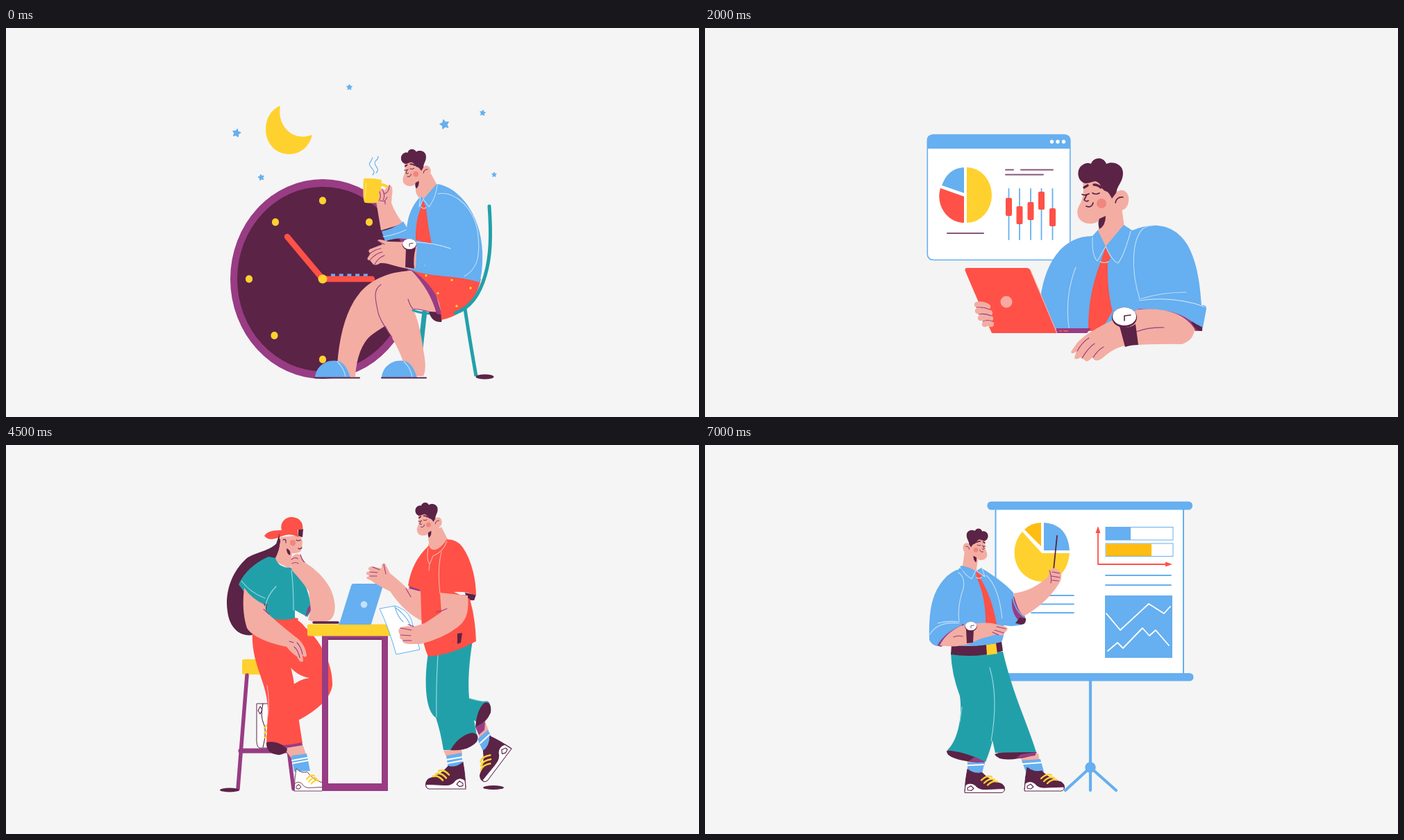
Write an HTML page that moves like this. It is 998 px wide and 561 px high and loops after 8 s.

```html
<!DOCTYPE html>
<html lang="en">
<head>
<meta charset="utf-8">
<title>Work day</title>
<style>
html, body { margin: 0; width: 100%; height: 100%; overflow: hidden; background: #f5f5f5; }
svg { display: block; width: 100%; height: 100%; }
.scene { visibility: hidden; animation: 8s step-end infinite; }
#coffee { animation-name: coffee; }
#desk { animation-name: desk; }
#meeting { animation-name: meeting; }
#talk { animation-name: talk; }
@keyframes coffee { 0% { visibility: visible; } 6.25%, 100% { visibility: hidden; } }
@keyframes desk { 0% { visibility: hidden; } 6.25% { visibility: visible; } 37.5%, 100% { visibility: hidden; } }
@keyframes meeting { 0% { visibility: hidden; } 37.5% { visibility: visible; } 68.75%, 100% { visibility: hidden; } }
@keyframes talk { 0% { visibility: hidden; } 68.75%, 100% { visibility: visible; } }
.blue { fill: #66aff0; }
.red { fill: #ff5147; }
.gold { fill: #ffd12e; }
.amber { fill: #ffbc12; }
.dark { fill: #5b2346; }
.plum { fill: #983c84; }
.skin { fill: #f4ada2; }
.teal { fill: #22a0aa; }
.white { fill: #fff; }
.ln { fill: none; stroke: #5b2346; stroke-width: 1.1; stroke-linecap: round; stroke-linejoin: round; }
.pale { stroke: #bfe0fb; }
.sky { stroke: #66aff0; }
.coral { stroke: #ff5147; }
.sun { stroke: #ffd12e; }
.violet { stroke: #983c84; }
.sea { stroke: #22a0aa; }
.snow { stroke: #fff; }
</style>
</head>
<body>
<svg viewBox="0 0 998 561">
<defs>
  <path id="star" class="blue" d="M0-1 .28-.42 .95-.31 .47.16 .59.81 0 .52-.59.81-.47.16-.95-.31-.28-.42Z" stroke="#66aff0" stroke-width=".2" stroke-linejoin="round"/>
  <g id="head">
    <path class="skin" d="M569 266 566 298Q568 312 577 316L604 288 600 258Z"/>
    <path class="skin" d="M544 222C546 235 545 245 540 254C533 264 535 280 552 282C562 283 568 279 573 272L599 263C608 262 611 252 610 244C608 234 600 232 594 236L588 215Z"/>
    <path class="dark" d="M577 271Q577 285 568 290Q565 281 568 275Z"/>
    <path class="dark" d="M548 224C536 222 534 204 543 198C549 193 555 195 556 196C559 186 574 185 578 196C588 191 602 197 602 209C602 222 594 226 592 238L586 246C583 240 581 236 576 235C568 230 572 224 562 221C556 222 552 224 548 224Z"/>
    <circle cx="571" cy="253" r="7" fill="#f18580"/>
    <path class="ln" style="stroke-width:3.4" d="M546 230 551 227M560 226Q566 226 570 230"/>
    <path class="ln" style="stroke-width:1.7" d="M543 240Q548 242 553 239M558 238Q563 241 568 238M550 240 546 248Q549 251 552 249M549 257Q557 260 559 252M591 252Q593 243 602 244M557 197Q559 203 563 205"/>
  </g>
  <g id="shoe">
    <path fill="var(--c)" stroke="#5b2346" d="M4-34Q14-26 25-29Q36-17 53-13Q59-9 57-3L0-2Q1-20 4-34Z"/>
    <path class="white" stroke="#5b2346" d="M1-11Q8-16 15-11Q20-4 31-5L57-6Q58-1 53 0H0Z"/>
    <path class="ln" d="M4-7 9-10 13-6 9-3 4-4Z"/>
    <path class="ln sun" style="stroke-width:2.4" d="M24-18Q32-26 39-23M28-14Q36-22 43-19M33-11Q40-18 47-16"/>
  </g>
  <g id="slipper">
    <path class="blue" d="M0 0C1-14 14-26 30-24C41-24 47-13 51 0Z"/>
    <path class="ln pale" d="M32-23Q42-13 44-1"/>
    <path class="ln" style="stroke-width:2" d="M0 .5H64"/>
  </g>
  <g id="watch">
    <ellipse class="dark" cy="1.5" rx="18" ry="14.5"/>
    <ellipse class="white" rx="17" ry="13"/>
    <path class="ln" style="stroke-width:1.6" d="M9-2 0-1V6"/>
  </g>
</defs>

<g id="coffee" class="scene">
  <use href="#star" transform="translate(332 151.5)rotate(12)scale(6)"/>
  <use href="#star" transform="translate(367.5 215.5)rotate(-12)scale(4.6)"/>
  <use href="#star" transform="translate(494.5 85.5)scale(4.3)"/>
  <use href="#star" transform="translate(631.5 139)rotate(-14)scale(6.7)"/>
  <use href="#star" transform="translate(686.5 122.5)rotate(8)scale(4.3)"/>
  <use href="#star" transform="translate(703 211.5)scale(3.7)"/>
  <path class="gold" d="M395 112C381 118 374 131 374 146C374 167 389 182 408 182C424 182 437 171 441 154C433 157 421 159 409 151C397 142 392 127 395 112Z"/>
  <ellipse class="plum" cx="456" cy="362" rx="133" ry="144"/>
  <ellipse class="dark" cx="456" cy="362" rx="123" ry="133"/>
  <path class="ln sun" style="stroke-width:10" d="M456 248.5v1M388 279.5v1M523 279.5v1M350 361.5v1M386.5 443v1M456 477.5v1"/>
  <path class="ln sky" style="stroke-width:4;stroke-dasharray:6 5.7;stroke-linecap:butt" d="M468 356.5H522"/>
  <path class="ln coral" style="stroke-width:8.5" d="M405 301 456 362H527"/>
  <circle class="gold" cx="456" cy="362" r="6.5"/>

  <path class="ln sea" style="stroke-width:7;stroke-linecap:butt" d="M603 408 597 462"/>
  <path class="skin" d="M583 350C541 352 515 370 501 394Q481 428 477 486L492 503H503Q505 468 520 449C532 435 556 428 575 405Z"/>
  <path class="skin" d="M583 350C545 356 526 368 533 392C537 425 563 450 572 482L588 502H601Q606 492 602 470C599 448 594 420 586 405L623 412 612 360Z"/>
  <path class="ln violet" d="M540 370C527 378 533 395 536 411C540 425 548 434 556 446M579 391Q582 401 586 405Q602 406 618 412"/>
  <use href="#slipper" x="445" y="504"/>
  <use href="#slipper" x="541" y="504"/>
  <path class="ln sea" style="stroke-width:3" d="M586 407Q600 413 628 412"/>
  <path class="dark" d="M609 409 630 410 627 424Q613 425 609 409Z"/>
  <path class="plum" d="M584 350Q611 378 620 412L628 414 612 360Z"/>
  <path class="red" d="M585 349 684 362Q678 390 657 408Q643 418 627 421C627 388 611 368 585 349Z"/>
  <path class="ln sun" style="stroke-width:3.5" d="M605 357v.1M642 363.5v.1M669 375v.1M622 382.5v.1M649 401v.1"/>
  <path class="ln sea" style="stroke-width:5" d="M696 257C699 300 698 330 690 357C682 385 668 404 647 411"/>
  <path class="ln sea" style="stroke-width:5;stroke-linecap:butt" d="M661 405Q667 445 677 502"/>
  <ellipse class="dark" cx="689.5" cy="503" rx="13" ry="3.6"/>

  <path class="blue" d="M596 244 606 250 622 225C655 231 684 272 686 322Q687 350 682 367C650 356 615 360 587 350Q563 343 557 335L578 325 577 300C576 275 584 257 596 244Z"/>
  <path class="skin" d="M596 224 612 210 621 227 602 249 596 242Z"/>
  <use href="#head" transform="translate(607 205)rotate(-6)scale(.56)translate(-602 -246)"/>
  <path class="blue" d="M597 241 601 247 620 225 623 228 615 250 603 250 596 262Z"/>
  <path class="red" d="M600 247 605 259Q607 283 613 311L590 306Q589 278 598 258Z"/>
  <path class="ln pale" d="M597 242 595 258 601 247 609 258Q619 245 621 227M622 239C648 235 673 260 679 292C683 322 682 346 660 358M591 309Q617 310 640 318M598 258Q601 262 605 259"/>
  <path class="skin" d="M533 250 540 292 572 282Q560 267 555 252Q557 235 553 226L545 239 540 252Z"/>
  <path class="blue" d="M541 293C553 291 564 285 572 279L589 306Q562 300 546 308Z"/>
  <path class="ln pale" d="M543 301Q562 298 576 291"/>
  <path class="gold" d="M515 217Q528 216 541 219L539 249Q537 254 517 252Q513 250 515 217Z"/>
  <path class="ln sun" style="stroke-width:4" d="M541 226Q552 227 549 237Q547 245 538 248"/>
  <path class="ln" style="stroke:#ffe995" d="M519 223 517 245"/>
  <path class="skin" d="M537 237Q539 228 545 234L552 226Q558 228 556 240Q552 254 546 257L535 251Q539 246 537 237Z"/>
  <path class="ln violet" d="M538 236Q541 244 537 249M542 233Q547 242 543 248M552 227Q552 237 545 239M539 249 545 250 549 244M546 250V254"/>
  <path class="ln sky" d="M528 212C536 205 518 199 525 193L528 187M533 209C541 202 526 198 533 191Q536 189 536 185"/>
  <path class="skin" d="M592 309 550 308Q539 304 535 306L542 312 524 319Q520 322 525 325L521 331Q519 335 524 335L529 341Q534 343 539 339C553 338 570 349 590 347Z"/>
  <path class="ln violet" d="M523 326Q532 319 540 318M524 335Q532 325 542 323M531 341Q536 331 545 328M535 307 545 312"/>
  <path class="dark" d="M576 317H590Q586 332 588 347L575 345Z"/>
  <use href="#watch" transform="translate(581 311.5)scale(.58)"/>
  <path class="blue" d="M591 309 618 312 622 348 589 347Q595 334 591 309Z"/>
  <path class="ln pale" d="M591 309Q617 310 640 318M603 342v.5"/>
</g>

<g id="desk" class="scene">
  <rect width="998" height="561" fill="#f4f4f4"/>
  <rect class="white" x="320.3" y="154" width="205.5" height="180.5" rx="8" stroke="#66aff0" stroke-width="1.6"/>
  <path class="blue" d="M320 174V161Q320 154 328 154H518Q526 154 526 161V174Z"/>
  <path class="ln snow" style="stroke-width:5.4" d="M499.5 164v.1M508 164v.1M516.5 164v.1"/>
  <path class="gold" d="M377 201A36 40 0 0 1 377 281Z"/>
  <path class="blue" d="M373 201V238L341 227Q350 202 373 201Z"/>
  <path class="red" d="M339 231 373 243V281C347 280 332 254 339 231Z"/>
  <path class="ln" style="stroke-width:2;stroke:#87567c" d="M349 296H401M433 204.5H444M455 204.5H501M433 211.5H487"/>
  <path class="ln sky" style="stroke-width:1.8" d="M437.5 232V305M453 232V305M469 232V305M484.5 232V305M500.5 232V305"/>
  <g class="red">
    <rect x="433" y="245" width="9" height="26" rx="2"/>
    <rect x="448.5" y="257" width="9" height="26" rx="2"/>
    <rect x="464.5" y="251" width="9" height="26" rx="2"/>
    <rect x="480" y="236" width="9" height="26" rx="2"/>
    <rect x="496" y="260" width="9" height="26" rx="2"/>
  </g>
  <path class="blue" d="M483 390C490 335 517 300 558 300L566 291 577 316 603 284 615 292C645 279 676 282 695 313C709 338 713 370 715 400L640 412 590 437H500Z"/>
  <use href="#head"/>
  <path class="blue" d="M566 292 577 315 603 284 615 292 603 330Q598 340 595 340L578 318 567 336Q558 330 558 304Z"/>
  <path class="red" d="M577 315 584 332 580 338Q579 380 587 408L570 437H552Q551 385 570 337Z"/>
  <path class="ln pale" d="M558 302Q557 329 565 336L577 315Q587 337 595 339Q604 327 613 293M569 337Q575 340 581 337M534 345Q518 386 524 432M626 391C612 345 616 305 630 290Q636 285 645 285M626 391Q658 381 693 381"/>
  <path class="plum" d="M506 433H556L550 440H506Z"/>
  <path class="ln coral" style="stroke-width:2" d="M511 437h2M517 437h5"/>
  <path class="red" d="M378 346H463Q467 346 469 350L507 440H413L375 351Q373 346 378 346Z"/>
  <path class="ln" style="stroke:#f7b2b0" d="M469 350 507 440"/>
  <circle cx="434" cy="395" r="8.5" fill="#f7a9a2"/>
  <path class="ln" style="stroke:#f4ada2;stroke-width:8.5" d="M392 399Q401 398 407 402M393 408Q403 407 410 411M397 418Q405 416 411 419M403 427Q409 424 412 427"/>
  <path class="ln violet" d="M391 403Q401 402 410 406M394 413Q404 411 412 415M400 423Q407 420 414 423"/>
  <path class="plum" d="M624 402Q680 402 708 426L716 437 706 437Q690 412 624 408Z"/>
  <path class="dark" d="M700 424 717 421 716 437Q707 438 700 424Z"/>
  <path class="blue" d="M626 391Q670 384 715 400Q722 399 722 405L717 432Q707 427 696 420C676 406 650 406 624 405Q621 396 626 391Z"/>
  <path class="ln pale" d="M625 393Q676 386 719 402"/>
  <path class="skin" d="M588 421C566 431 546 443 536 454L527 467Q528 472 535 466L532 475Q533 480 541 475L547 479Q549 484 558 475Q562 483 571 477C583 467 593 460 606 458Q650 455 687 456Q704 450 705 434C693 414 665 402 624 406Z"/>
  <path class="ln violet" d="M536 466Q543 453 553 447M543 476Q552 461 561 455M559 475Q566 464 574 460M621 438Q640 431 661 432"/>
  <path class="dark" d="M597 430Q609 435 620 427L624 457Q613 457 605 460Z"/>
  <use href="#watch" x="604" y="416"/>
</g>

<g id="meeting" class="scene">
  <path class="gold" d="M343 309H390V331H343Q340 331 340 328V312Q340 309 343 309Z"/>
  <path class="ln violet" style="stroke-width:5.5" d="M347 332 334 496M407 440 414 496"/>
  <path class="ln violet" style="stroke-width:7" d="M338 441H408"/>
  <ellipse class="dark" cx="322" cy="497.5" rx="14" ry="3"/>
  <path class="white" stroke="#5b2346" d="M361 373H380V437H365Q360 435 361 420Z"/>
  <path class="ln" d="M370 373Q366 390 371 402Q376 412 370 436M366 377 369 382 366 388 363 383Z"/>
  <path class="ln sun" style="stroke-width:2.4" d="M379 401 372 408M379 409 372 416M379 417 373 422"/>
  <path class="dark" d="M396 134C385 153 362 153 347 163C323 184 315 216 319 240C322 266 340 279 359 273L380 240Z"/>
  <path class="red" d="M402 250Q418 246 431 263C455 284 471 318 470 347Q466 373 421 397L413 380 410 349Q421 338 437 336Q418 333 405 315Z"/>
  <path class="red" d="M355 268C352 318 378 342 377 385L375 431Q400 437 427 430Q421 394 417 362Q415 335 406 305L421 250 390 245Z"/>
  <path class="ln pale" style="stroke:#ffb1a5" d="M376 347Q380 369 377 392"/>
  <path class="skin" d="M400 437 427 431 434 452 412 453Z"/>
  <path class="dark" d="M375 429Q387 425 404 436Q408 444 393 447Q374 445 375 429Z"/>
  <path class="plum" d="M399 433Q413 432 426 429L427 433 403 437Z"/>
  <path class="blue" d="M411 448 433 445 438 470 415 471Z"/>
  <path class="ln snow" style="stroke-width:2" d="M412 455 434 451M413 459 435 455"/>
  <use href="#shoe" transform="translate(415 499)scale(.75 .95)" style="--c:#fff"/>

  <path class="skin" d="M395 133 424 130 427 139 426 150Q424 157 412 156L410 179 386 167Q396 149 395 133Z"/>
  <path class="dark" d="M404 149Q411 152 409 159Q404 157 404 149ZM421 122 428 121 427 133 421 131Z"/>
  <path class="red" d="M372 131Q377 122 397 123C394 112 402 104 411 104C423 104 429 113 427 122L420 122 421 133Q409 126 396 132Q378 140 372 131Z"/>
  <path class="dark" d="M396 121Q392 130 395 138L392 148 388 146Z"/>
  <circle cx="413" cy="141" r="4.2" fill="#f18580"/>
  <path class="ln" d="M418 137Q421 139 424 137M421 149Q423 151 426 148M399 137Q404 134 403 141"/>
  <path class="plum" d="M343 199 374 220 367 236Q349 222 343 208Z"/>
  <path class="teal" d="M335 201Q347 175 378 161L388 163Q392 177 410 177L420 183Q436 205 440 238L434 248 416 238V250Q393 255 373 247L376 229 365 229Q348 221 335 201Z"/>
  <path class="ln" style="stroke:#9cdde0" d="M339 196Q352 213 373 221M373 241Q373 220 389 204M411 181Q414 202 414 238"/>
  <path class="skin" d="M343 206Q354 222 372 230L375 241Q393 258 416 276Q431 286 433 304Q431 308 427 303L428 312Q423 315 419 305Q411 300 404 291C380 286 355 277 347 264Q339 240 343 206Z"/>
  <path class="ln violet" d="M371 237 379 244M419 285Q425 291 427 302M415 291Q421 296 423 307M408 283 414 285"/>
  <path class="plum" d="M440 228 438 240 431 248 434 236Z"/>
  <path class="skin" d="M413 160Q420 154 425 160L430 169Q454 184 466 205C477 227 475 246 467 252Q451 260 435 252L439 238 436 211Q426 196 412 181Q408 170 413 160Z"/>
  <path class="ln violet" d="M411 165Q416 161 420 164M412 171Q417 168 421 171M430 169Q426 166 424 158"/>

  <path class="plum" fill-rule="evenodd" d="M455 274H550V499H455ZM464 281V488H541V281Z"/>
  <path class="ln" d="M464 280H541"/>
  <rect class="gold" x="434" y="258.5" width="122" height="17" rx="2"/>
  <path class="ln" style="stroke-width:3.5" d="M443 256H478"/>
  <path class="ln sky" style="stroke-width:2" d="M480 258H525"/>
  <path class="blue" d="M500 200H542Q544 200 543 203L526 258H480L497 203Q498 200 500 200Z"/>
  <circle cx="515.5" cy="230" r="4.8" fill="#c4e1f9"/>

  <path class="skin" d="M600 254Q575 243 553 211Q536 203 525 195L520 193Q517 190 524 189Q516 186 520 183L525 182Q518 177 527 175L541 178Q540 169 546 171L553 185Q568 197 579 208L581 202 602 205Z"/>
  <path class="ln violet" d="M524 189 534 189M524 183 535 184M528 176 538 180M544 172 547 186M576 207 583 219"/>
  <path class="teal" d="M608 300C601 345 605 385 619 393Q626 414 630 440Q660 441 679 424L674 397Q687 408 697 384Q699 369 691 369Q679 370 667 365Q664 330 672 282Z"/>
  <path class="ln" style="stroke:#9cdde0" d="M622 303Q619 350 620 392M667 365Q684 370 692 370"/>
  <path class="skin" d="M630 441 656 438 657 447 634 449ZM676 406 690 399 697 417 683 425Z"/>
  <path class="dark" d="M690 371Q700 371 698 386Q692 401 676 407Q678 380 690 371Z"/>
  <path class="plum" d="M676 407 690 399 689 411 681 418Z"/>
  <path class="dark" d="M640 440Q652 419 671 415Q683 416 678 428Q665 442 640 440Z"/>
  <path class="blue" d="M634 448 656 444 658 465 637 468ZM679 424 694 411 702 427 688 444Z"/>
  <path class="ln snow" style="stroke-width:2" d="M634 454 657 450M636 459 657 455M683 430 696 418"/>
  <ellipse class="dark" cx="702" cy="494" rx="15" ry="3"/>
  <use href="#shoe" transform="translate(662 496)scale(-1 1.13)" style="--c:#5b2346"/>
  <use href="#shoe" transform="translate(728 438)rotate(-53)scale(-1.08 1.05)" style="--c:#5b2346"/>

  <path class="skin" d="M613 128 627 118 637 138 615 156 607 148Z"/>
  <use href="#head" transform="translate(623.5 110)rotate(-6)scale(.5)translate(-602 -246)"/>
  <path class="plum" d="M625 215 676 217 674 224 626 222ZM581 202 598 206 596 211 581 207Z"/>
  <path class="dark" d="M661 213 677 216 674 224 664 223Z"/>
  <path class="red" d="M609 145C612 154 622 155 635 136Q650 136 658 148C671 167 677 195 677 217Q664 211 645 212L668 222Q676 250 677 283Q640 303 608 305Q601 290 599 270L597 209 579 203Q584 168 609 145Z"/>
  <path class="dark" d="M650 272 657 271 655 285 650 287Z"/>
  <path class="ln" style="stroke:#ffb1a5" d="M608 149Q605 165 610 172L615 160Q629 155 635 139M610 172 609 181M627 155Q621 177 625 214"/>
  <path class="white" stroke="#66aff0" d="M538 236 560 232Q577 237 583 250L596 295 562 302Q551 263 538 236Z"/>
  <path class="ln sky" d="M560 233Q564 248 572 255M560 234Q579 247 584 265"/>
  <path class="skin" d="M625 213 665 217C667 242 663 253 650 263Q629 279 597 287L580 287Q570 286 571 281Q565 279 568 274Q563 269 567 264Q574 260 587 262L603 257 627 241Z"/>
  <path class="ln violet" d="M568 264 584 267M568 274 583 275M572 282 584 282M619 241Q627 240 635 236M587 262Q584 260 579 259"/>
</g>

<g id="talk" class="scene">
  <rect x="418.5" y="92" width="270.5" height="240" class="white" stroke="#66aff0" stroke-width="2"/>
  <rect class="blue" x="406.5" y="81.5" width="295.5" height="12" rx="5.5"/>
  <rect class="blue" x="408" y="329" width="295.5" height="11.5" rx="5.5"/>
  <path class="ln sky" style="stroke-width:4.2" d="M555 340V498M555 465 519 498M555 465 592 498"/>
  <circle class="blue" cx="555" cy="465" r="7.7"/>
  <path class="blue" d="M488 112Q522 114 525 152H488Z"/>
  <path class="amber" d="M484 112V146L460 122Q470 112 484 112Z"/>
  <path class="gold" d="M457 125 485 156H525C523 181 508 197 486 197C447 196 434 151 457 125Z"/>
  <path class="ln sky" style="stroke-width:1.8" d="M470 217H531M470 229.5H531M470 242H531M577 188H671M577 202H671"/>
  <path class="ln coral" style="stroke-width:1.8" d="M566 122V172H667"/>
  <path class="red" d="M566 117 569.5 127H562.5ZM673 172 663 168.5V175.5Z"/>
  <g fill="none" stroke="#66aff0">
    <rect x="577" y="118.5" width="97" height="18.5"/>
    <rect x="577" y="142" width="97" height="18.5"/>
  </g>
  <path class="blue" d="M577 118.5H613V137H577ZM576 217H673V307H576Z"/>
  <path class="amber" d="M577.5 142.5H643V160H577.5Z"/>
  <path class="ln snow" style="stroke-width:1.8" d="M578 243 598 267 639 229 661 243 670 233M580 297 594 285 602 293 630 264 640 275 649 267 668 289"/>

  <path class="skin" d="M377 455 405 453 402 463 379 462ZM453 449 480 445 482 456 457 456Z"/>
  <path class="blue" d="M378 458 403 457 399 473 378 476ZM456 455 483 453 488 471 463 474Z"/>
  <path class="ln snow" style="stroke-width:2" d="M378 462 401 461M458 460 484 458"/>
  <use href="#shoe" x="374" y="501.5" style="--c:#5b2346"/>
  <use href="#shoe" x="460" y="499" style="--c:#5b2346"/>
  <path class="dark" d="M348 441Q360 436 405 455Q397 460 377 456Q347 451 348 441ZM417 446Q434 439 478 443Q468 451 452 452Q423 457 417 446Z"/>
  <path class="plum" d="M380 456 388 450 404 454 402 458ZM448 452 455 446 478 443 475 448Z"/>
  <path class="teal" d="M354 300Q355 330 367 362C371 390 365 425 349 440Q380 444 404 457Q411 440 414 426L418 444Q445 443 477 443C464 400 444 362 429 298Z"/>
  <path class="ln" style="stroke:#9cdde0" d="M410 321Q423 365 412 427M370 378 367 399"/>
  <path class="dark" d="M355 288Q391 293 427 283L429 297Q390 308 354 302Z"/>
  <path class="gold" d="M405 288 419 286 421 301 406 303Z"/>
  <path class="plum" d="M441 213 453 229 462 251 448 255Z"/>
  <path class="skin" d="M444 214Q471 211 494 190L497 181Q507 176 513 185L512 196Q495 226 459 247Q451 241 444 214Z"/>
  <path class="ln" style="stroke-width:1.8" d="M507 131 502 180"/>
  <path class="skin" d="M497 180Q503 175 507 180Q516 184 512 195L502 203 495 198Z"/>
  <path class="ln violet" d="M500 183 511 185M499 189 511 191M500 195 509 196M496 181Q500 190 498 199"/>
  <path class="blue" d="M369 174 390 184 399 178Q430 197 444 213Q444 235 461 249L460 258Q446 263 430 260Q432 274 427 284Q392 293 356 288L358 260 362 184Z"/>
  <path class="plum" d="M442 220Q447 242 461 250L460 258Q440 250 442 220Z"/>
  <path class="dark" d="M453 249 462 250Q463 258 455 259L447 257Z"/>
  <path class="skin" d="M374 152 371 175 390 185 393 166Z"/>
  <use href="#head" transform="translate(375.5 147)scale(-.48 .48)rotate(-4)translate(-602 -246)"/>
  <path class="blue" d="M369 174Q379 175 390 182L398 177Q404 183 403 191L392 184 384 194Q373 188 368 178Z"/>
  <path class="red" d="M390 180 399 187 397 193Q413 219 420 258L404 262Q405 220 391 191Z"/>
  <path class="ln pale" d="M368 177Q375 188 384 193L390 181 403 190 399 178M391 191Q394 194 398 191M405 188Q423 204 428 250"/>
  <path class="plum" d="M333 289Q345 269 372 258L376 268 340 291Z"/>
  <path class="blue" d="M370 178Q353 182 343 195C325 216 322 245 323 281Q326 288 334 290Q345 270 370 260C362 231 380 205 370 178Z"/>
  <path class="ln pale" d="M365 184Q375 190 372 207Q363 233 366 254M335 257Q349 253 366 255M324 273Q335 254 366 257"/>
  <path class="skin" d="M368 261Q394 255 413 257L433 262Q438 265 434 268L429 274Q424 276 419 273L410 276Q395 279 383 286Q361 293 338 289Q347 271 368 261Z"/>
  <path class="ln violet" d="M420 262 433 265M417 267 430 271M414 270 423 274M358 277Q363 274 371 276"/>
  <path class="dark" d="M376 266 387 266 386 285 377 286Z"/>
  <use href="#watch" transform="translate(383 261)scale(.49)"/>
</g>
</svg>
</body>
</html>
```
